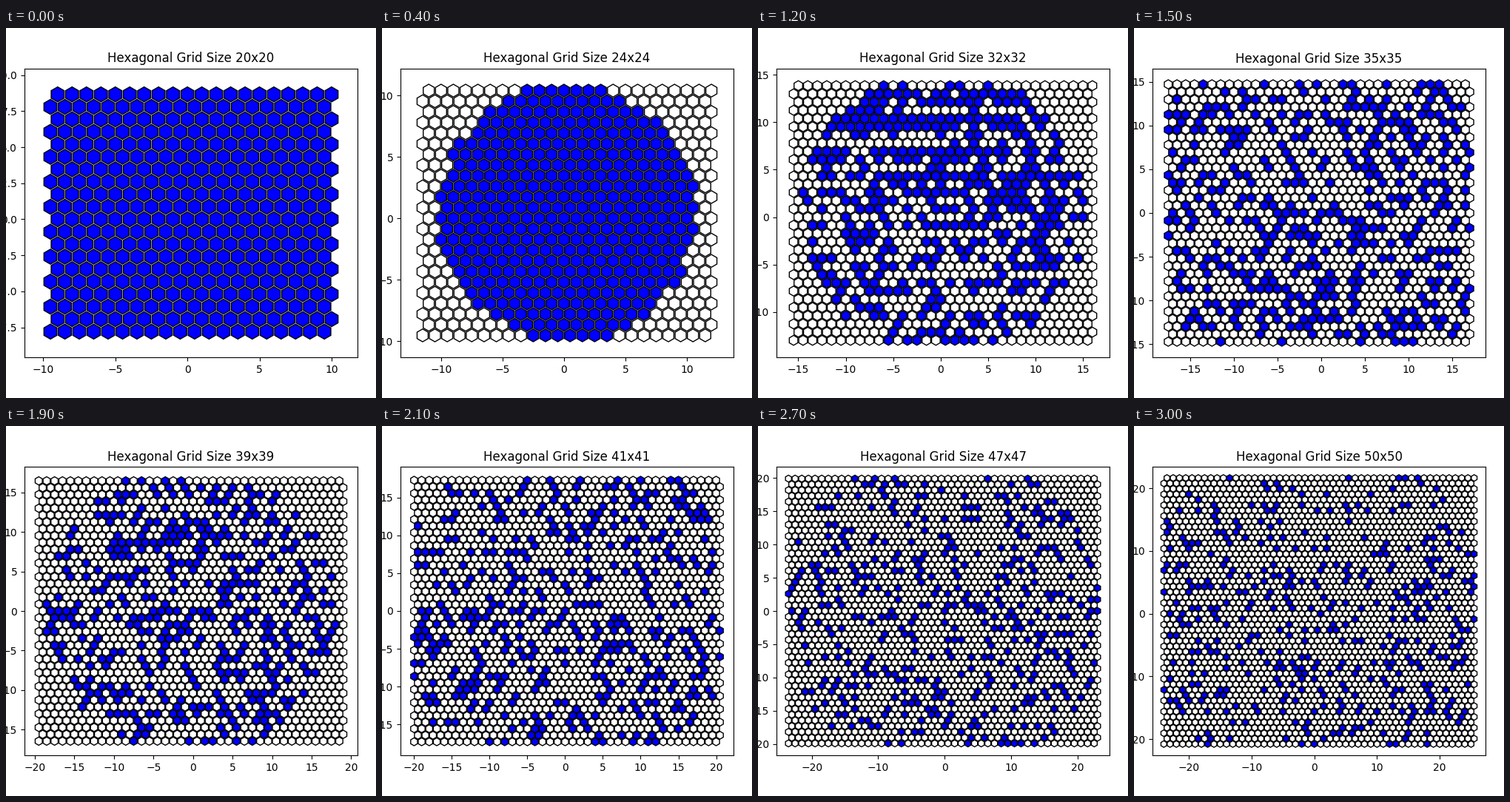
A matplotlib script that plays this animation: 500x500 px, repeating every 3.1 s.

```python
import numpy as np
import matplotlib.pyplot as plt
from matplotlib.animation import FuncAnimation
from matplotlib.collections import PolyCollection

FIRST, LAST = 20, 50
KEEP = 400
DIAM = 0.9
RATIO = np.sqrt(3) / 2

angles = np.pi / 2 + np.arange(6) * np.pi / 3
HEXAGON = DIAM / np.sqrt(3) * np.column_stack([np.cos(angles), np.sin(angles)])


def hex_centers(n):
    """Centres of an n x n hexagonal lattice, row by row, around the origin."""
    x, y = np.meshgrid(np.arange(n), np.arange(n))
    x = x.astype(float)
    x[1::2] += 0.5
    y = y * RATIO
    half = np.ceil(n / 2)
    mid_x = half - 1 + 0.5 * (half % 2 == 0)
    mid_y = (half - 1) * RATIO
    return np.column_stack([x.ravel() - mid_x, y.ravel() - mid_y])


def pick_cells(centers):
    """Evenly thinned choice of cells, ordered from the middle outwards."""
    x, y = centers[:, 0], centers[:, 1]
    dist = np.sqrt((x - np.mean(x)) ** 2 + (y - np.mean(y)) ** 2)
    step = len(centers) // KEEP
    return np.argsort(dist)[::step][:KEEP]


fig = plt.figure(figsize=(5, 5), dpi=100, facecolor="white")
ax = fig.add_axes([0.05, 0.05, 0.9, 0.9])


def update(i):
    n = FIRST + i
    centers = hex_centers(n)
    colors = np.ones((n * n, 3))
    colors[pick_cells(centers)] = (0, 0, 1)

    ax.clear()
    cells = PolyCollection(centers[:, None, :] + HEXAGON, facecolors=colors,
                           edgecolors="black", linewidths=1.0,
                           joinstyle="miter")
    ax.add_collection(cells, autolim=False)
    ax.set_aspect("equal")
    low = centers.min(axis=0) - 2 * DIAM
    high = centers.max(axis=0) + 2 * DIAM
    ax.axis([low[0], high[0], low[1], high[1]])
    ax.set_title(f"Hexagonal Grid Size {n}x{n}")
    return [cells]


anim = FuncAnimation(fig, update, frames=LAST - FIRST + 1, interval=100,
                     init_func=lambda: update(0), repeat=True, repeat_delay=0)
plt.show()
```
